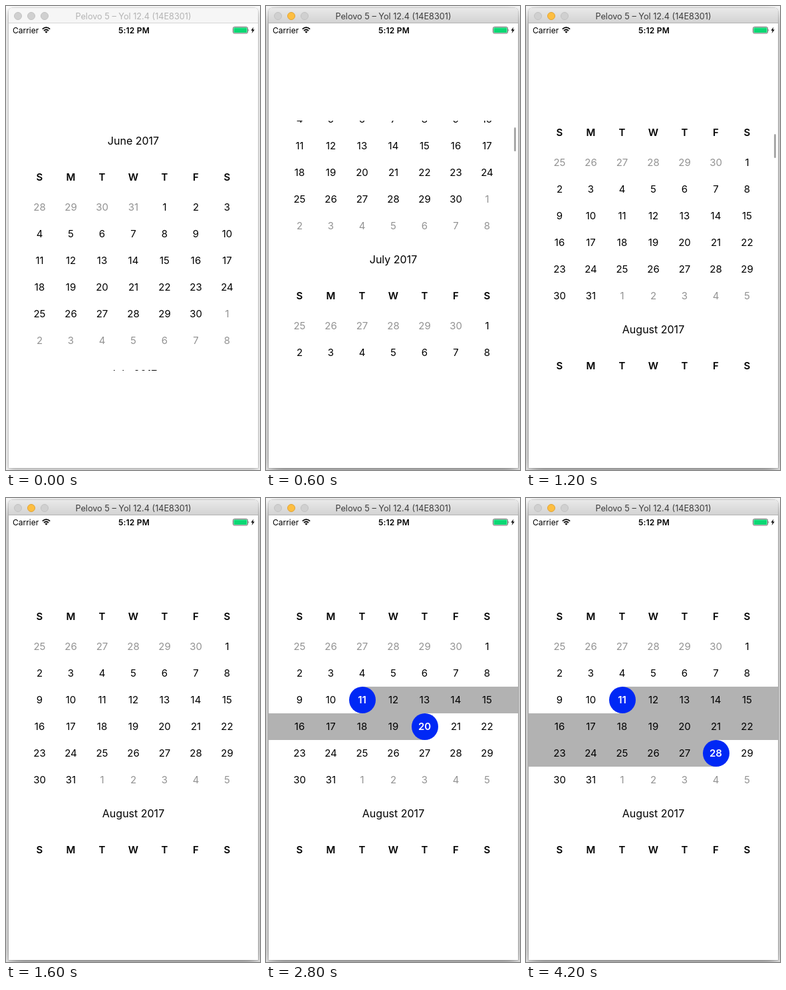
Write an HTML page that moves like this. It is 382 by 696 pixels and loops after 4300 ms.

```html
<!DOCTYPE html>
<html lang="en">
<head>
<meta charset="utf-8">
<title>Calendar range picker</title>
<style>
@property --scroll { syntax: "<number>"; inherits: true; initial-value: 0; }

html, body { margin: 0; width: 100%; height: 100%; overflow: hidden; background: #fff; }
body { position: relative; font-family: Inter, Roboto, sans-serif; color: #000; }
body * { position: absolute; box-sizing: border-box; white-space: nowrap; }

.win, .win * { animation: 4300ms step-end infinite; }
.win {
  left: 4px; top: 3px; width: 375px; height: 690px;
  background: #fff; border-radius: 5px 5px 0 0;
  animation-name: shadow;
}
.bar {
  left: 0; top: 0; width: 375px; height: 23px;
  border-bottom: 1px solid #d6d6d6; border-radius: 5px 5px 0 0;
  animation-name: bar;
}
.name {
  left: 0; top: 0; width: 375px; line-height: 25px; text-align: center;
  font-size: 12.7px; animation-name: name;
}
.dot {
  top: 6px; width: 12px; height: 12px; border-radius: 50%;
  background: #d0d0d0; border: 1px solid #c2c2c2;
}
.dot.amber { animation-name: amber; }

.carrier { left: 6px; top: 23px; font-size: 12px; line-height: 21px; }
.clock {
  left: 0; top: 23px; width: 377px; text-align: center;
  font-size: 12px; font-weight: 600; line-height: 21px; letter-spacing: .2px;
}
.icons { left: 0; top: 0; width: 375px; height: 50px; }

.view {
  left: 0; top: 169px; width: 375px; height: 375px; overflow: hidden;
  animation-name: scroll !important;
}
.list { left: 0; top: 0; width: 375px; transform: translateY(calc(var(--scroll) * -1px)); }
.month { left: 0; width: 375px; height: 350px; }
.title { left: 0; top: 10px; width: 375px; text-align: center; font-size: 16px; line-height: 40px; }
.cell { width: 47px; height: 40px; line-height: 40px; text-align: center; font-size: 15px; }
.head { font-weight: 600; }
.out { color: #939393; }
.band { height: 40px; background: #b2b2b2; }
.pick {
  width: 40px; height: 40px; border-radius: 50%; background: #0028f5; color: #fff;
  text-align: center; font-size: 15px; font-weight: 600; line-height: 40px;
}
.thumb {
  left: 369px; top: 3px; width: 3px; height: 36px; border-radius: 2px; background: #a8a8a8;
  transform: translateY(calc(var(--scroll) * .0408px));
  animation-name: thumb;
}
.first { animation-name: first; }
.second { animation-name: second; }
.third { animation-name: third; }

@keyframes shadow {
  0% { box-shadow: 0 0 0 .5px rgba(0,0,0,.2), 0 4px 12px rgba(0,0,0,.32); }
  9.3%, 100% { box-shadow: 0 0 0 .5px rgba(0,0,0,.25), 0 8px 22px rgba(0,0,0,.5); }
}
@keyframes bar {
  0% { background: #f6f6f6; border-color: #d6d6d6; }
  9.3%, 100% { background: linear-gradient(#e9e9e9, #d3d3d3); border-color: #b4b4b4; }
}
@keyframes name { 0% { color: #b4b4b4; } 9.3%, 100% { color: #3c3c3c; } }
@keyframes amber {
  0% { background: #d0d0d0; border-color: #c2c2c2; }
  9.3%, 100% { background: #fdbe41; border-color: #e0a434; }
}
/* quick flick, then a glide to rest, at ten steps a second */
@keyframes scroll {
  0% { --scroll: 0; }
  9.3% { --scroll: 14; }
  11.62% { --scroll: 86; }
  13.95% { --scroll: 172; }
  16.27% { --scroll: 246; }
  18.6% { --scroll: 303; }
  20.93% { --scroll: 346; }
  23.25% { --scroll: 378; }
  25.58% { --scroll: 401; }
  27.9% { --scroll: 417; }
  30.23%, 100% { --scroll: 429; }
}
@keyframes thumb {
  0% { opacity: 0; }
  9.3% { opacity: 1; }
  34.88% { opacity: .45; }
  37.2%, 100% { opacity: 0; }
}
@keyframes first { 0% { opacity: 0; } 44.18%, 100% { opacity: 1; } }
@keyframes second { 0% { opacity: 0; } 53.48% { opacity: 1; } 67.44%, 100% { opacity: 0; } }
@keyframes third { 0% { opacity: 0; } 67.44%, 100% { opacity: 1; } }
</style>
</head>
<body>
<div class="win">
  <div class="bar">
    <i class="dot" style="left:8px"></i>
    <i class="dot amber" style="left:28px"></i>
    <i class="dot" style="left:48px"></i>
    <div class="name">Pelovo 5 – Yol 12.4 (14E8301)</div>
  </div>
  <div class="carrier">Carrier</div>
  <div class="clock">5:12 PM</div>
  <svg class="icons" viewBox="4 3 375 50">
    <g fill="none" stroke="#000" stroke-width="1.7">
      <path d="M54.8 34.6Q60.5 29.6 66.2 34.6"/>
      <path d="M57 37Q60.5 34 64 37"/>
    </g>
    <path d="M58.4 38.6Q60.5 37 62.6 38.6L60.5 40.8Z"/>
    <rect x="341.5" y="31.5" width="22" height="9.5" rx="2" fill="#fff" stroke="#444" stroke-width=".8"/>
    <rect x="342.5" y="32.5" width="20" height="7.5" rx="1" fill="#0bd874"/>
    <path d="M364.6 34.5q1.6 1.7 0 3.5z" fill="#444"/>
    <path d="M372.4 31.5l-4 5.3h2.4l-1.2 4.2 4.2-5.6h-2.5z"/>
  </svg>
  <div class="view">
    <div class="list"></div>
    <i class="thumb"></i>
  </div>
</div>
<script>
const list = document.querySelector('.list');
const names = ['June', 'July', 'August'];
const COL = 47, ROW = 40, LEFT = 23, TOP = 110;

function add(parent, cls, text, box = {}) {
  const el = document.createElement('div');
  el.className = cls;
  el.textContent = text;
  for (const k in box) el.style[k] = box[k] + 'px';
  parent.append(el);
  return el;
}

const colX = c => LEFT + c * COL;
const midX = c => colX(c) + COL / 2;
const rowY = r => TOP + r * ROW;

function band(month, cls, row, from, to) {
  add(month, 'band ' + cls, '', { left: from, top: rowY(row), width: to - from });
}

function pick(month, cls, day, row, col) {
  add(month, 'pick ' + cls, day, { left: midX(col) - 20, top: rowY(row) });
}

names.forEach((name, i) => {
  const month = add(list, 'month', '', { top: i * 350 });
  const index = i + 5;
  const july = index === 6;
  add(month, 'title', name + ' 2017');
  [...'SMTWTFS'].forEach((d, c) => add(month, 'cell head', d, { left: colX(c), top: 65 }));

  if (july) {
    band(month, 'first from', 2, midX(2), midX(2));
    band(month, 'second', 2, midX(2), 375);
    band(month, 'second', 3, 0, midX(4));
    band(month, 'third', 2, midX(2), 375);
    band(month, 'third', 3, 0, 375);
    band(month, 'third', 4, 0, midX(5));
  }

  const lead = new Date(2017, index, 1).getDay() || 0;
  for (let n = 0; n < 42; n++) {
    const date = new Date(2017, index, 1 - lead + n);
    const cls = date.getMonth() === index ? 'cell' : 'cell out';
    add(month, cls, date.getDate(), { left: colX(n % 7), top: rowY(Math.floor(n / 7)) });
  }

  if (july) {
    pick(month, 'first', 11, 2, 2);
    pick(month, 'second', 20, 3, 4);
    pick(month, 'third', 28, 4, 5);
  }
});
</script>
</body>
</html>
```
